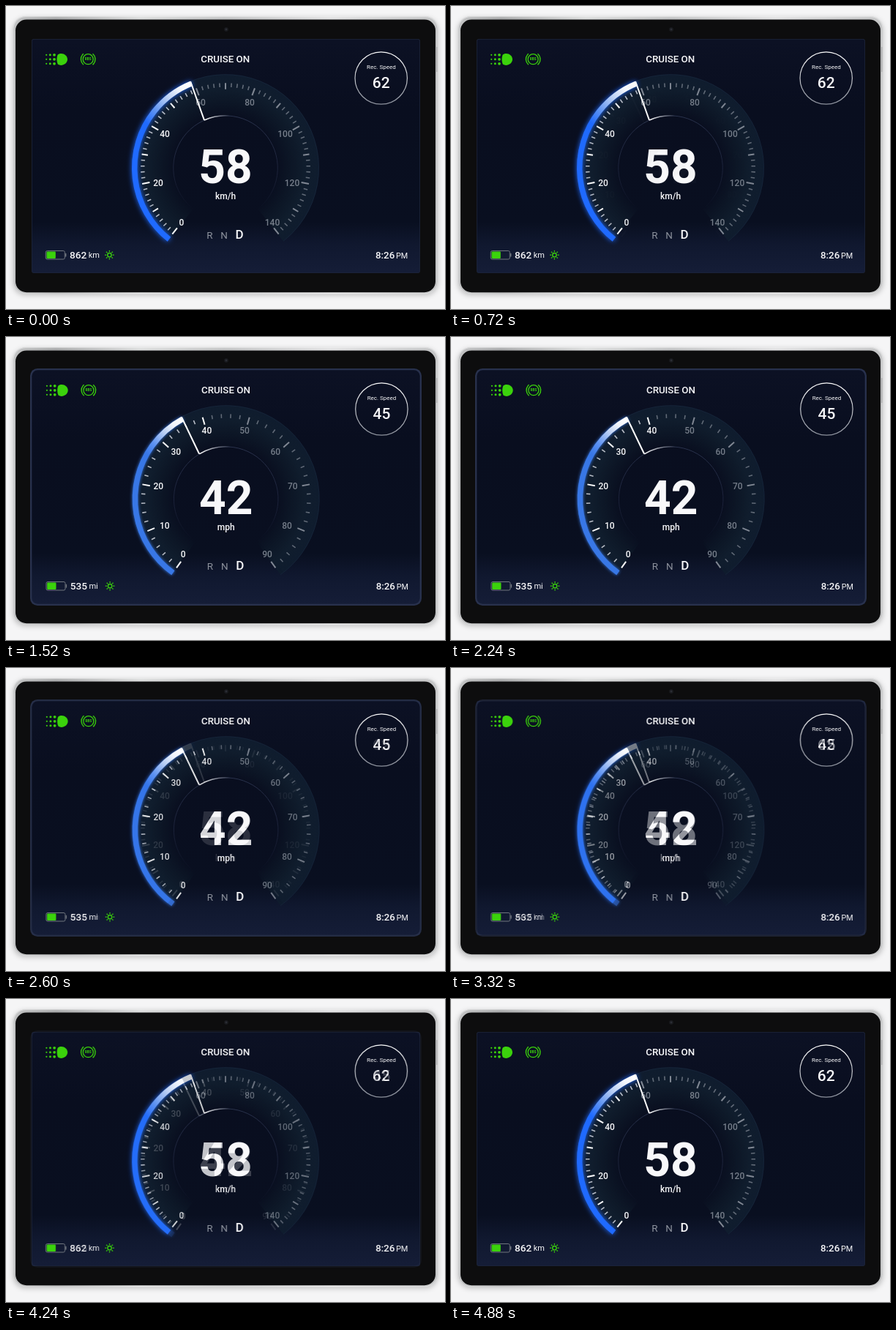
Write an HTML page with a canvas that moves like this. It is 600 by 414 pixels and loops after 4.92 s.

```html
<!DOCTYPE html>
<html lang="en">
<head>
<meta charset="utf-8">
<title>Cruise dashboard</title>
<style>
  html, body { margin: 0; width: 100%; height: 100%; overflow: hidden; background: #f5f5f6; }
  canvas { display: block; width: 600px; height: 414px; }
</style>
</head>
<body>
<canvas id="stage"></canvas>
<script>
const W = 600, H = 414, LOOP = 4920;
const RATIO = window.devicePixelRatio || 1;
const GREEN = '#3bd20c', WHITE = '#f8f8fa';
const TAU = Math.PI * 2;
const rad = deg => deg * Math.PI / 180;

const METRIC = {
  speed: '58', unit: 'km/h', limit: '62', range: '862', rangeUnit: 'km',
  shift: 0, max: 140, label: 20, start: 128.8, lit: 58,
  labels: [[240, 296], [208, 242], [217, 175], [266, 132], [333, 132], [381.5, 175], [391, 242], [364, 296]],
  needle: [[253.5, 105.5], [271, 156]], arcStart: 128.3, blue: '#1f6aff', glow: 7, frame: false
};
const IMPERIAL = {
  speed: '42', unit: 'mph', limit: '45', range: '535', rangeUnit: 'mi',
  shift: 0.7, max: 90, label: 10, start: 125.7, lit: 40.5,
  labels: [[241.5, 297], [216, 257.5], [207.5, 203.5], [231.5, 156.5], [273.7, 128],
    [325.3, 128], [367.5, 156.5], [391, 203.5], [383.3, 257.5], [356.3, 297]],
  needle: [[240.5, 111.5], [263.3, 159.5]], arcStart: 125.6, blue: '#3978e6', glow: 4, frame: true
};
const CX = 300, CY = 221.2, RIM = 128;

function makeLayer(canvas, paint) {
  canvas.width = W * RATIO;
  canvas.height = H * RATIO;
  const c = canvas.getContext('2d');
  c.scale(RATIO, RATIO);
  if (paint) paint(c);
  return canvas;
}

function gradient(c, x0, y0, x1, y1, stops) {
  const g = c.createLinearGradient(x0, y0, x1, y1);
  stops.forEach(([at, color]) => g.addColorStop(at, color));
  return g;
}

function box(c, x, y, w, h, r, fill) {
  c.beginPath();
  c.roundRect(x, y, w, h, r);
  c.fillStyle = fill;
  c.fill();
}

function outline(c, x, y, w, h, r, stroke) {
  c.beginPath();
  c.roundRect(x, y, w, h, r);
  c.strokeStyle = stroke;
  c.lineWidth = 1;
  c.stroke();
}

function disc(c, x, y, r, fill) {
  c.beginPath();
  c.arc(x, y, r, 0, TAU);
  c.fillStyle = fill;
  c.fill();
}

function arc(c, x, y, r, from, to, stroke, width) {
  c.beginPath();
  c.arc(x, y, r, rad(from), rad(to));
  c.strokeStyle = stroke;
  c.lineWidth = width;
  c.stroke();
}

function line(c, x0, y0, x1, y1, stroke, width) {
  c.beginPath();
  c.moveTo(x0, y0);
  c.lineTo(x1, y1);
  c.strokeStyle = stroke;
  c.lineWidth = width;
  c.stroke();
}

function text(c, str, x, y, size, weight = 500, color = WHITE, align = 'center') {
  c.font = `${weight} ${size}px Roboto, sans-serif`;
  c.textAlign = align;
  c.fillStyle = color;
  c.fillText(str, x, y);
}

const needleAngle = ([x, y]) => Math.atan2(y - CY, x - CX) / rad(1) + 360;

function paintDevice(c) {
  c.fillStyle = '#f5f5f6';
  c.fillRect(0, 0, W, H);
  c.save();
  c.shadowColor = 'rgba(0,0,0,.22)';
  c.shadowBlur = 7 * RATIO;
  c.shadowOffsetY = 2 * RATIO;
  box(c, 9.5, 14.3, 581, 379, 17, gradient(c, 10, 0, 590, 0, [
    [0, '#c3c4c5'], [.1, '#a9aaab'], [.3, '#dcdddd'], [.5, '#c2c3c4'], [.75, '#e2e2e3'], [1, '#c3c4c5']]));
  c.restore();
  outline(c, 10, 14.8, 580, 378, 16.5, 'rgba(255,255,255,.45)');
  box(c, 13, 18.5, 574, 372.7, 15, '#0d0d0e');
  line(c, 588.7, 56, 588.7, 90, '#a3a4a5', 1.2);
  disc(c, 301, 32, 3, '#191a1d');
  disc(c, 301, 32, 1.4, '#2b2d35');
}

function paintScreen(c, s) {
  const fill = gradient(c, 0, 45, 0, 365, [
    [0, '#0c1124'], [.3, '#090e1f'], [.78, '#090f20'], [.88, '#10182f'], [1, '#151d37']]);
  if (s.frame) {
    box(c, 33, 43, 535, 324, 10, '#29324e');
    box(c, 35.3, 45.3, 530.4, 319.4, 8, fill);
  } else {
    box(c, 35, 45, 531, 320, 3, '#1d253a');
    box(c, 35.8, 45.8, 529.4, 318.4, 2.5, fill);
  }
}

function paintLamp(c) {
  [55.2, 60.3, 66].forEach((x, i) => {
    [66.8, 72.8, 78.8].forEach(y => disc(c, x, y, 1.1 + i * .4, GREEN));
  });
  c.beginPath();
  c.moveTo(71, 66.3);
  c.bezierCurveTo(76, 62.8, 84, 66.3, 84, 72.8);
  c.bezierCurveTo(84, 79.3, 76, 82.8, 71, 79.8);
  c.bezierCurveTo(69, 76.3, 69, 69.3, 71, 66.3);
  c.fill();
}

function paintBrake(c) {
  arc(c, 112.2, 72.7, 7, 0, 360, GREEN, 1.3);
  arc(c, 112.2, 72.7, 9.8, 130, 230, GREEN, 1.4);
  arc(c, 112.2, 72.7, 9.8, -50, 50, GREEN, 1.4);
  text(c, 'RBS', 112.2, 74.3, 4.6, 700, GREEN);
}

function paintStatus(c, s) {
  text(c, 'CRUISE ON', 299.7, 77, 13.3);
  arc(c, 512.7, 98.5, 35.7, 0, 360, gradient(c, 0, 62, 0, 135, [[0, '#ffffff'], [1, '#8b909b']]), 1.2);
  text(c, 'Rec. Speed', 512.8, 86, 8, 400);
  text(c, s.limit, 512.7, 112, 21);

  outline(c, 54.3, 334.5, 26, 11.5, 2, '#70767f');
  box(c, 81, 337.8, 1.4, 5, .7, '#70767f');
  box(c, 55.5, 335.6, 12.3, 9.3, 1, GREEN);
  text(c, s.range, 87, 344.6, 13.7, 500, WHITE, 'left');
  text(c, s.rangeUnit, 112.7, 344.2, 11, 400, WHITE, 'left');

  arc(c, 141.4, 340.2, 2.7, 0, 360, GREEN, 1.4);
  for (let i = 0; i < 8; i++) {
    const dx = Math.cos(i * TAU / 8), dy = Math.sin(i * TAU / 8);
    line(c, 141.4 + dx * 4.3, 340.2 + dy * 4.3, 141.4 + dx * 6.3, 340.2 + dy * 6.3, GREEN, 1.3);
  }
  text(c, '8:26', 505, 344.6, 13.3, 500, WHITE, 'left');
  text(c, 'PM', 549.3, 344.6, 10.8, 400, WHITE, 'right');
}

function paintDial(c, s) {
  const end = 540 - s.arcStart;
  const ring = c.createRadialGradient(CX, CY, 70, CX, CY, RIM);
  [[0, 'rgba(15,28,43,0)'], [.35, 'rgba(15,28,43,.6)'], [.65, '#101d2d'], [1, '#0f1c2e']]
    .forEach(([at, color]) => ring.addColorStop(at, color));
  c.beginPath();
  c.arc(CX, CY, RIM, rad(s.arcStart), rad(end));
  c.arc(CX, CY, 70, rad(end), rad(s.arcStart), true);
  c.closePath();
  c.fillStyle = ring;
  c.fill();
  arc(c, CX, CY, RIM - .5, s.arcStart, end, 'rgba(36,54,78,.35)', 1);

  const foot = s.needle[1];
  arc(c, CX, CY, 71.3, 132, 408, gradient(c, 0, 150, 0, 280, [[0, '#2a334d'], [.6, '#1b2239'], [1, 'rgba(27,34,57,0)']]), 1);
  arc(c, CX, CY, 71.3, needleAngle(foot), 278, gradient(c, foot[0], 0, 306, 0, [[0, '#ffffff'], [1, 'rgba(255,255,255,0)']]), 1.5);
}

function paintScale(c, s) {
  const sweep = 2 * (270 - s.start);
  for (let v = 0; v <= s.max; v += 2) {
    const a = rad(s.start + v / s.max * sweep);
    const dx = Math.cos(a), dy = Math.sin(a);
    const labelled = v % s.label === 0, major = v % 10 === 0, lit = v <= s.lit;
    const outer = 116, inner = labelled ? 105.5 : major ? 107.5 : 110.5;
    const color = lit ? (major ? '#ffffff' : '#b9bec7') : (major ? '#818894' : '#626b78');
    line(c, CX + dx * outer, CY + dy * outer, CX + dx * inner, CY + dy * inner, color, major ? 2 : 1.6);
  }
  s.labels.forEach(([x, y], i) => {
    const value = i * s.label;
    text(c, String(value), x, y + 4.2, 12, 500, value <= s.lit ? WHITE : '#767e8a');
  });
}

function paintProgress(c, s) {
  const [tip, foot] = s.needle;
  c.save();
  c.shadowColor = s.blue;
  c.shadowBlur = s.glow * RATIO;
  const tint = gradient(c, 192, 160, tip[0] - 2, tip[1], [
    [0, s.blue], [.25, '#5e93f2'], [.55, '#b9cff5'], [.8, '#f3f6fc'], [1, '#ffffff']]);
  arc(c, CX, CY, 124.3, s.arcStart, needleAngle(tip), tint, 7.4);
  c.restore();
  line(c, tip[0] - 1.2, tip[1] - 2, foot[0], foot[1], '#ffffff', 2);
}

function paintDashboard(c, s) {
  paintScreen(c, s);
  c.translate(s.shift, 0);
  paintDial(c, s);
  paintScale(c, s);
  paintProgress(c, s);
  text(c, s.speed, 300, 242, 64, 700);
  text(c, s.unit, 300, 264, 12);
  text(c, 'R', 278.3, 318.2, 13.5, 400, '#8d929d');
  text(c, 'N', 298, 318.2, 13.5, 400, '#8d929d');
  text(c, 'D', 319, 318, 17);
  paintLamp(c);
  paintBrake(c);
  paintStatus(c, s);
}

const progress = (t, from, to) => Math.min(1, Math.max(0, (t - from) / (to - from)));
const smooth = p => p * p * (3 - 2 * p);

const offscreen = paint => makeLayer(document.createElement('canvas'), paint);
const device = offscreen(paintDevice);
const metric = offscreen(c => paintDashboard(c, METRIC));
const imperial = offscreen(c => paintDashboard(c, IMPERIAL));
const stage = makeLayer(document.getElementById('stage')).getContext('2d');
const began = performance.now();

function render() {
  const t = (performance.now() - began) % LOOP;
  stage.globalAlpha = 1;
  stage.drawImage(device, 0, 0, W, H);
  stage.drawImage(metric, 0, 0, W, H);
  stage.globalAlpha = smooth(progress(t, 650, 1560)) * (1 - progress(t, 2230, 4800));
  stage.drawImage(imperial, 0, 0, W, H);
  requestAnimationFrame(render);
}
render();
</script>
</body>
</html>
```
